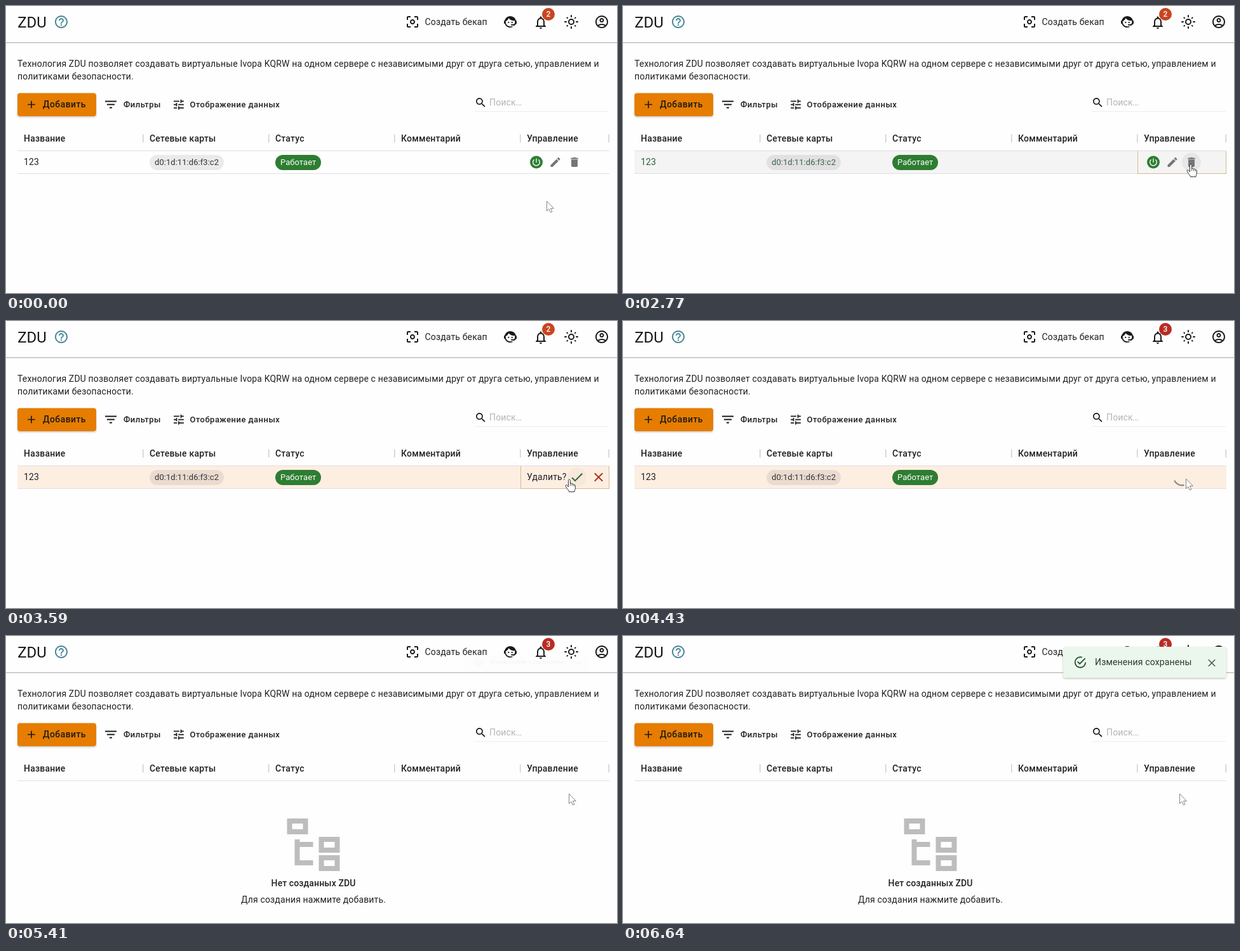
An HTML page that plays this animation: 962x453 px, repeating every 6710 ms.

```html
<!DOCTYPE html>
<html lang="ru">
<head>
<meta charset="utf-8">
<title>ZDU</title>
<style>
html, body { margin: 0; width: 100%; height: 100%; overflow: hidden; background: #fefefe; }
svg.stage { display: block; width: 962px; height: 453px; }
text { font: 400 14px Roboto, Arial, sans-serif; letter-spacing: .15px; fill: #212121; white-space: pre; }
.title { font-size: 24px; letter-spacing: 0; fill: #161616; }
.head { font-weight: 500; letter-spacing: .2px; }
.main { font-weight: 500; letter-spacing: .42px; fill: #1c1a17; }
.tool { font-weight: 500; font-size: 13px; letter-spacing: .45px; }
.hint { fill: #b4b4b4; }
.chip { font-size: 13px; letter-spacing: .05px; fill: #333; }
.light { fill: #fff; }
.num { font-size: 12px; font-weight: 500; letter-spacing: 0; fill: #fff; }
.mid { text-anchor: middle; }
.head.mid { letter-spacing: .1px; }
.hover .name { fill: #2d5f3b; }
.hover .chip.mac { fill: #3c6049; }
</style>
</head>
<body>
<svg class="stage" viewBox="0 0 962 453" xmlns="http://www.w3.org/2000/svg">
  <defs>
    <filter id="soft" x="-20%" y="-40%" width="140%" height="200%">
      <feDropShadow dx="0" dy="1.5" stdDeviation="1.5" flood-color="#000" flood-opacity=".22"/>
    </filter>
  </defs>
  <rect width="962" height="453" fill="#fefefe"/>

  <g id="top">
    <text class="title" x="18.2" y="33.5">ZDU</text>
    <text x="659.5" y="30">Создать бекап</text>
    <g fill="none" stroke="#1b1b1b" stroke-width="2" stroke-linecap="round">
      <circle cx="890" cy="25" r="4"/>
      <g id="rays"></g>
    </g>
    <rect y="57" width="962" height="1.5" fill="#bfbfbf"/>
  </g>
  <g id="badge">
    <circle id="dot" cx="854" cy="13" r="10"/>
    <text id="count" class="num mid" x="854" y="17.3"></text>
  </g>

  <text x="18" y="96">Технология ZDU позволяет создавать виртуальные Ivopa KQRW на одном сервере с независимыми друг от друга сетью, управлением и</text>
  <text x="18" y="116">политиками безопасности.</text>

  <rect x="18" y="137.5" width="124" height="36.5" rx="4" fill="#e67d05" filter="url(#soft)"/>
  <text class="main" x="58" y="160">Добавить</text>
  <text class="tool" x="185" y="160">Фильтры</text>
  <text class="tool" x="289.5" y="160">Отображение данных</text>
  <text class="hint" x="761" y="157">Поиск…</text>
  <rect x="738" y="166" width="211" height="1" fill="#ececec"/>

  <g id="row">
    <rect id="tint" x="18" y="229" width="932" height="36"/>
    <rect x="18" y="264" width="932" height="1" fill="#e0e0e0"/>
    <text class="name" x="28" y="251">123</text>
    <rect x="226" y="235" width="117" height="24" rx="12" fill="#000" fill-opacity=".08"/>
    <text class="chip mac" x="234" y="251">d0:1d:11:d6:f3:c2</text>
    <rect x="424" y="235" width="72" height="24" rx="12" fill="#2e7d32"/>
    <text class="chip light" x="432" y="251">Работает</text>
    <circle id="halo" cx="895" cy="246.5" r="15" fill="#000" fill-opacity=".05"/>
    <g id="tools"><circle cx="835" cy="246.5" r="10" fill="#2e7d32"/></g>
    <g id="confirm">
      <circle cx="899" cy="246.5" r="15" fill="#000" fill-opacity=".025"/>
      <text x="820" y="251">Удалить?</text>
    </g>
    <rect id="focus" x="810.5" y="228.5" width="139" height="36" fill="none" stroke="#d8b88e"/>
    <g id="spin" fill="none" stroke="#918b86" stroke-width="3.6">
      <circle id="arc" r="20.2"/>
    </g>
  </g>

  <g id="heads"><rect x="18" y="228" width="932" height="1" fill="#e0e0e0"/></g>

  <g id="empty">
    <g fill="none" stroke="#bdbdbd" stroke-width="8">
      <path d="M446.5 292h25v17h-25zM496.5 321h25v17h-25zM496.5 350h25v17h-25z"/>
      <path d="M458.5 321v37h25M458.5 329h25"/>
    </g>
    <text class="head mid" x="484" y="395">Нет созданных ZDU</text>
    <text class="mid" x="484" y="421">Для создания нажмите добавить.</text>
  </g>

  <g id="toast">
    <rect x="693" y="17" width="257" height="49" rx="4" fill="#ebf6ec" filter="url(#soft)"/>
    <text x="743" y="46" style="fill:#2c3a30">Изменения сохранены</text>
  </g>

  <g id="arrow" fill="#fff" stroke="#777" stroke-width=".9" stroke-linejoin="round">
    <path d="M.5 0V15.7L4 12.4 6.4 17.9 8.9 16.8 6.5 11.4H11.3Z"/>
  </g>
  <g id="hand" fill="#fff" stroke="#333" stroke-width="1" stroke-linejoin="round">
    <path d="M-1.6 1.6C-1.6-.4 1.4-.4 1.4 1.6V7C1.7 5.7 4 5.8 4.2 7.3V8C4.6 6.7 6.8 6.9 7 8.3V9.1C7.4 8 9.3 8.3 9.3 10V14C9.3 16.3 8.1 17 8 19.6H-.5C-.6 17.4-2.4 16.6-3.6 14.4L-6 10.6C-6.6 9-4.4 8.3-3.4 9.6L-1.6 11.7Z"/>
    <path d="M1.4 7V10.4M4.2 8V10.6M7 9V11" fill="none" stroke-width=".8"/>
  </g>
</svg>

<script>
const LOOP = 6710;
const NS = 'http://www.w3.org/2000/svg';
const el = id => document.getElementById(id);

function add(parent, tag, attrs, content) {
  const node = document.createElementNS(NS, tag);
  for (const key in attrs) node.setAttribute(key, attrs[key]);
  if (content) node.textContent = content;
  return el(parent).appendChild(node);
}

// Icons sit on a 24-unit grid and are placed by their centre.
function icon(parent, cx, cy, size, fill, d) {
  const k = size / 24;
  add(parent, 'path', { d, fill, transform: `translate(${cx - size / 2} ${cy - size / 2}) scale(${k})` });
}

const INK = '#1b1b1b', GREY = '#757575';
const CLOSE = 'M19 6.41L17.59 5 12 10.59 6.41 5 5 6.41 10.59 12 5 17.59 6.41 19 12 13.41 17.59 19 19 17.59 13.41 12z';

icon('top', 87, 25, 24, '#4a8797', 'M11 18h2v-2h-2v2zm1-16C6.48 2 2 6.48 2 12s4.48 10 10 10 10-4.48 10-10S17.52 2 12 2zm0 18c-4.41 0-8-3.59-8-8s3.59-8 8-8 8 3.59 8 8-3.59 8-8 8zm0-14c-2.21 0-4 1.79-4 4h2c0-1.1.9-2 2-2s2 .9 2 2c0 2-3 1.75-3 5h2c0-2.25 3-2.5 3-5 0-2.21-1.79-4-4-4z');
icon('top', 640, 25, 24, INK, 'M5 15H3v4c0 1.1.9 2 2 2h4v-2H5v-4zM5 5h4V3H5c-1.1 0-2 .9-2 2v4h2V5zm14-2h-4v2h4v4h2V5c0-1.1-.9-2-2-2zm0 16h-4v2h4c1.1 0 2-.9 2-2v-4h-2v4zM12 8c-2.21 0-4 1.79-4 4s1.79 4 4 4 4-1.79 4-4-1.79-4-4-4zm0 6c-1.1 0-2-.9-2-2s.9-2 2-2 2 .9 2 2-.9 2-2 2z');
icon('top', 794, 25, 24, INK, 'M18.72 14.76C19.07 13.91 19.26 13 19.26 12C19.26 11.28 19.15 10.59 18.96 9.95C18.31 10.1 17.63 10.18 16.92 10.18C13.86 10.18 11.15 8.67 9.5 6.34C8.61 8.5 6.91 10.26 4.77 11.22C4.73 11.47 4.73 11.74 4.73 12A7.27 7.27 0 0 0 12 19.27C13.05 19.27 14.06 19.04 14.97 18.63L15.78 20.26C14.14 20.81 12.87 21.08 12 21.08C9.58 21.08 7.27 20.13 5.57 18.42C4.53 17.38 3.76 16.11 3.33 14.73H2V10.18H3.09C3.93 6.04 7.6 2.92 12 2.92C14.4 2.92 16.71 3.87 18.42 5.58C19.69 6.84 20.54 8.45 20.89 10.18H22V14.73H21.94L18.38 18L13.08 17.4V15.73H17.91ZM8.13 12.91a1.14 1.14 0 0 0 2.28 0a1.14 1.14 0 0 0-2.28 0zM13.58 12.91a1.14 1.14 0 0 0 2.28 0a1.14 1.14 0 0 0-2.28 0z');
icon('top', 842, 26, 24, INK, 'M12 22c1.1 0 2-.9 2-2h-4c0 1.1.9 2 2 2zm6-6v-5c0-3.07-1.63-5.64-4.5-6.32V4c0-.83-.67-1.5-1.5-1.5s-1.5.67-1.5 1.5v.68C7.64 5.36 6 7.92 6 11v5l-2 2v1h16v-1l-2-2zm-2 1H8v-6c0-2.48 1.51-4.5 4-4.5s4 2.02 4 4.5v6z');
icon('top', 938, 25, 24, INK, 'M12 2C6.48 2 2 6.48 2 12s4.48 10 10 10 10-4.48 10-10S17.52 2 12 2zM7.35 18.5C8.66 17.56 10.26 17 12 17s3.34.56 4.65 1.5C15.34 19.44 13.74 20 12 20s-3.34-.56-4.65-1.5zm10.79-1.38C16.45 15.8 14.32 15 12 15s-4.45.8-6.14 2.12C4.7 15.73 4 13.95 4 12c0-4.42 3.58-8 8-8s8 3.58 8 8c0 1.95-.7 3.73-1.86 5.12zM12 6c-1.93 0-3.5 1.57-3.5 3.5S10.07 13 12 13s3.5-1.57 3.5-3.5S13.93 6 12 6zm0 5c-.83 0-1.5-.67-1.5-1.5S11.17 8 12 8s1.5.67 1.5 1.5S12.83 11 12 11z');
for (let i = 0; i < 8; i++) {
  const [from, to] = i % 2 ? [8.3, 9.3] : [8, 10];
  add('rays', 'path', { d: `M${from} 0H${to}`, transform: `translate(890 25) rotate(${i * 45})` });
}

const bar = add('top', 'g', { id: 'bar' });
icon('bar', 40, 155.5, 20, INK, 'M19 13h-6v6h-2v-6H5v-2h6V5h2v6h6v2z');
icon('bar', 165, 155.5, 24, INK, 'M10 18h4v-2h-4v2zM3 6v2h18V6H3zm3 7h12v-2H6v2z');
icon('bar', 272, 155.5, 21, INK, 'M3 17v2h6v-2H3zM3 5v2h10V5H3zm10 16v-2h8v-2h-8v-2h-2v6h2zM7 9v2H3v2h4v2h2V9H7zm14 4v-2H11v2h10zm-6-4h2V7h4V5h-4V3h-2v6z');
icon('bar', 747.5, 152.5, 20, INK, 'M15.5 14h-.79l-.28-.27C15.41 12.59 16 11.11 16 9.5 16 5.91 13.09 3 9.5 3S3 5.91 3 9.5 5.91 16 9.5 16c1.61 0 3.09-.59 4.23-1.57l.27.28v.79l5 4.99L20.49 19l-4.99-5zm-6 0C7.01 14 5 11.99 5 9.5S7.01 5 9.5 5 14 7.01 14 9.5 11.99 14 9.5 14z');
el('heads').before(bar);

icon('tools', 835, 246.5, 16, '#fff', 'M13 3h-2v10h2V3zm4.83 2.17l-1.42 1.42C17.99 7.86 19 9.81 19 12c0 3.87-3.13 7-7 7s-7-3.13-7-7c0-2.19 1.01-4.14 2.58-5.42L6.17 5.17C4.23 6.82 3 9.26 3 12c0 4.97 4.03 9 9 9s9-4.03 9-9c0-2.74-1.23-5.18-3.17-6.83z');
icon('tools', 865, 246.5, 20, GREY, 'M3 17.25V21h3.75L17.81 9.94l-3.75-3.75L3 17.25zM20.71 7.04c.39-.39.39-1.02 0-1.41l-2.34-2.34c-.39-.39-1.02-.39-1.41 0l-1.83 1.83 3.75 3.75 1.83-1.83z');
icon('tools', 895, 246.5, 20, GREY, 'M6 19c0 1.1.9 2 2 2h8c1.1 0 2-.9 2-2V7H6v12zM19 4h-3.5l-1-1h-5l-1 1H5v2h14V4z');
icon('confirm', 899, 246.5, 24, '#2f6637', 'M9 16.17L4.83 12l-1.42 1.41L9 19 21 7l-1.41-1.41z');
icon('confirm', 933, 246.5, 24, '#a8391a', CLOSE);
icon('toast', 720, 41.5, 22, '#2f5138', 'M20 12A8 8 0 0 1 12 20A8 8 0 0 1 4 12A8 8 0 0 1 12 4C12.76 4 13.5 4.11 14.2 4.31L15.77 2.74C14.61 2.26 13.34 2 12 2A10 10 0 0 0 2 12A10 10 0 0 0 12 22A10 10 0 0 0 22 12M7.91 10.08L6.5 11.5L11 16L21 6L19.59 4.58L11 13.17L7.91 10.08Z');
icon('toast', 927, 42.5, 20, '#55625a', CLOSE);

['Название', 'Сетевые карты', 'Статус', 'Комментарий', 'Управление'].forEach((label, i) => {
  add('heads', 'text', { class: 'head', x: 28 + i * 198, y: 213.5 }, label);
  add('heads', 'rect', { x: i < 4 ? 215 + i * 198 : 948.5, y: 202.5, width: 1.5, height: 13, fill: '#cfcfcf' });
});

const HOVER = 530, ASK = 2900, LOAD = 4185, GONE = 5340, TOAST = 5380;
const spans = {
  row: [0, GONE],
  tools: [0, ASK],
  halo: [660, ASK],
  focus: [2770, LOAD],
  confirm: [ASK, LOAD],
  spin: [LOAD, GONE],
  empty: [GONE, LOOP],
  toast: [TOAST, LOOP]
};
const pointer = [
  [0, 'arrow', 851, 308],
  [200, 'arrow', 855, 300],
  [330, 'arrow', 864, 283],
  [530, 'arrow', 884, 258],
  [660, 'hand', 894, 250],
  [3170, 'hand', 891, 250],
  [3240, 'hand', 887, 250],
  [LOAD, 'arrow', 886, 249],
  [6640, 'arrow', 876, 249]
];

const ease = x => (1 - Math.cos(Math.PI * x)) / 2;
const show = (id, on) => el(id).setAttribute('display', on ? 'inline' : 'none');

function drawSpinner(t) {
  const p = Math.max(0, t - LOAD) % 1400 / 1400;
  const growing = p < .5;
  const k = ease(p * 2 % 1);
  const length = growing ? 1 + 99 * k : 100;
  const offset = growing ? 15 * k : 15 + 110 * k;
  el('spin').setAttribute('transform', `translate(880 246.5) scale(${28 / 44}) rotate(${360 * p})`);
  el('arc').setAttribute('stroke-dasharray', `${length} 200`);
  el('arc').setAttribute('stroke-dashoffset', -offset);
}

function drawToast(t) {
  const k = ease(Math.min(1, Math.max(0, (t - TOAST) / 225)));
  const sx = .75 + .25 * k, sy = .5625 + .4375 * k;
  el('toast').setAttribute('opacity', k);
  el('toast').setAttribute('transform', `translate(821.5 41.5) scale(${sx} ${sy}) translate(-821.5 -41.5)`);
}

function draw(t) {
  for (const id in spans) show(id, t >= spans[id][0] && t < spans[id][1]);

  const hover = t >= HOVER && t < ASK;
  el('row').setAttribute('class', hover ? 'hover' : '');
  el('tint').setAttribute('fill', hover ? '#f4f4f4' : t >= ASK ? '#fdeee2' : '#fefefe');

  const alert = t >= 4220;
  el('dot').setAttribute('fill', alert ? '#b92c25' : '#c9451f');
  el('count').textContent = alert ? '3' : '2';

  const [, kind, x, y] = pointer.filter(step => t >= step[0]).pop();
  show('arrow', kind === 'arrow');
  show('hand', kind === 'hand');
  el(kind).setAttribute('transform', `translate(${x} ${y})`);

  drawSpinner(t);
  drawToast(t);
}

const start = performance.now();
function tick() {
  draw((performance.now() - start) % LOOP);
  requestAnimationFrame(tick);
}
tick();
</script>
</body>
</html>
```
